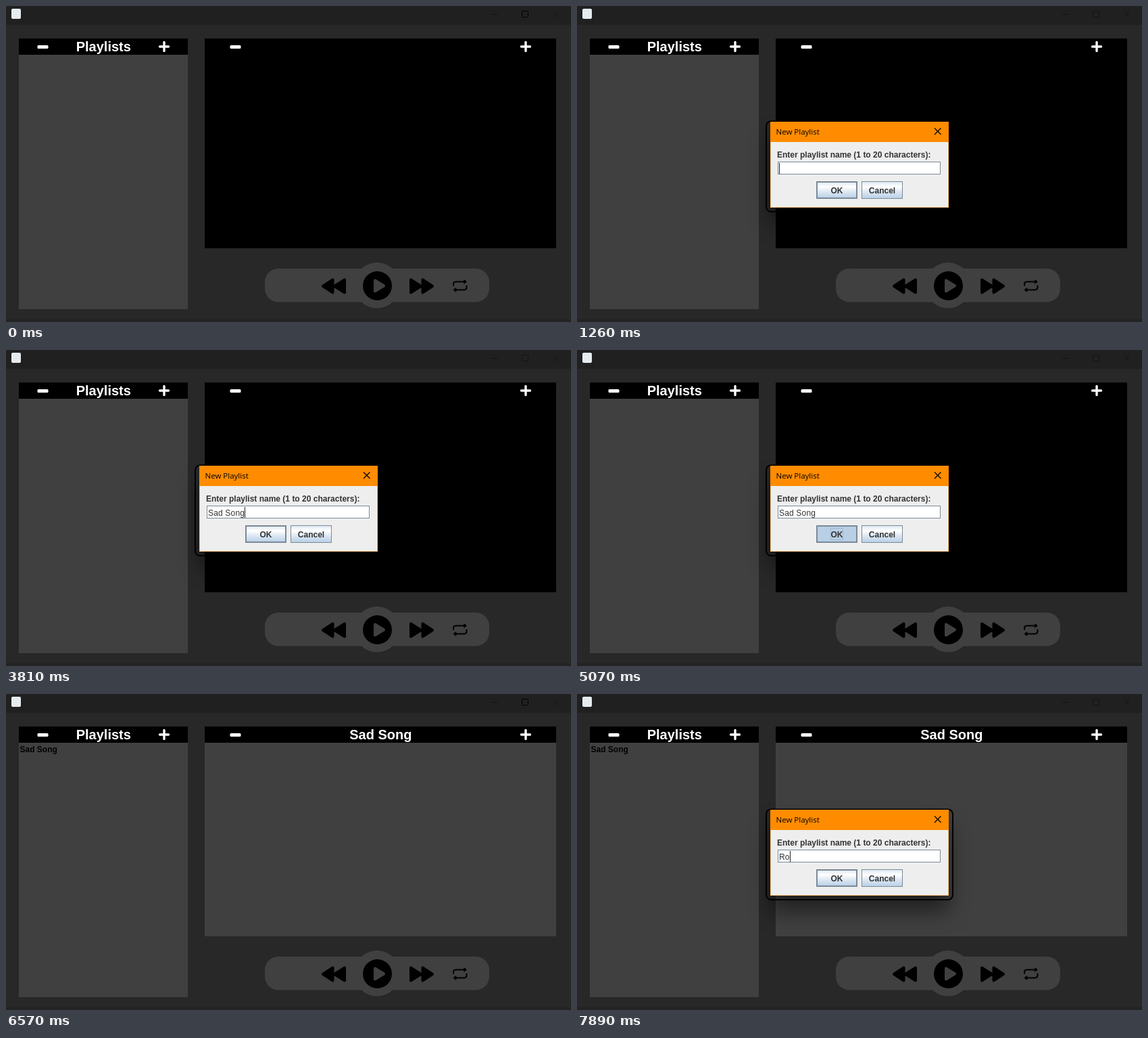
Animation of 836x467 px, one loop 8 s. Source, as an HTML page:

```html
<!DOCTYPE html>
<html lang="en">
<head>
<meta charset="utf-8">
<title>Playlists</title>
<style>
html, body { margin: 0; width: 100%; height: 100%; overflow: hidden; background: #282828; }
svg { display: block; width: 836px; height: 467px; }
text { font-family: "Liberation Sans", Arial, sans-serif; font-size: 12px; }
.head { font-size: 20px; font-weight: bold; fill: #fff; text-anchor: middle; }
.bold { font-weight: bold; fill: #333; }
.mid { text-anchor: middle; }
</style>
</head>
<body>
<svg viewBox="0 0 836 467">
  <defs>
    <linearGradient id="metal" x2="0" y2="1">
      <stop offset="0" stop-color="#dde8f3"/>
      <stop offset=".3" stop-color="#fff"/>
      <stop offset=".6" stop-color="#dde8f3"/>
      <stop offset="1" stop-color="#b8cfe5"/>
    </linearGradient>
    <filter id="blur" x="-40%" y="-70%" width="180%" height="240%"><feGaussianBlur stdDeviation="16"/></filter>
    <path id="plus" d="M-6.5 0H6.5M0-6.5V6.5" stroke="#fff" stroke-width="3.4" stroke-linecap="round"/>
    <rect id="minus" x="-8" y="-2.5" width="16" height="5" rx="1.5" fill="#fff"/>
    <path id="skip" d="M-16-9.5L-1 0L-16 9.5ZM1.5-9.5L16 0L1.5 9.5Z" stroke="#000" stroke-width="4" stroke-linejoin="round"/>
  </defs>

  <rect width="836" height="467" fill="#282828"/>
  <rect width="836" height="28" fill="#202020"/>
  <rect y="463" width="836" height="4" fill="#232323"/>
  <rect x="8" y="4" width="14" height="15" rx="2" fill="#e6ebf0"/>
  <g fill="none" stroke="#131313">
    <path d="M718 12.5H728M809.5 7.5L818.5 16.5M818.5 7.5L809.5 16.5"/>
    <rect id="maxi" x="763.5" y="7.5" width="9" height="9" rx="1"/>
  </g>

  <rect x="19" y="48" width="250" height="400" fill="#404040"/>
  <rect x="19" y="48" width="250" height="24"/>
  <use href="#minus" x="54.5" y="60.5"/>
  <text class="head" x="144.3" y="67">Playlists</text>
  <g id="add"><use href="#plus"/></g>

  <rect x="294" y="48" width="520" height="310"/>
  <g id="made">
    <rect x="294" y="72" width="520" height="286" fill="#404040"/>
    <text class="head" x="554.3" y="67">Sad Song</text>
    <text x="20.5" y="86" font-weight="bold">Sad Song</text>
  </g>
  <use href="#minus" x="339.5" y="60.5"/>
  <use href="#plus" x="769" y="60"/>

  <g fill="#404040">
    <rect x="383" y="388" width="332" height="49.5" rx="20"/>
    <circle cx="549" cy="412.8" r="33.7"/>
  </g>
  <use href="#skip" transform="translate(485 414) scale(-1 1)"/>
  <use href="#skip" transform="translate(615 414)"/>
  <circle cx="549.5" cy="413.5" r="21.5"/>
  <path d="M546 405.5L559 413.5L546 421.5Z" fill="#404040" stroke="#404040" stroke-width="4" stroke-linejoin="round"/>
  <g fill="none" stroke="#000" stroke-width="2" stroke-linecap="round" stroke-linejoin="round">
    <path d="M662 413V411.5Q662 407.5 666 407.5H680M681.5 413.5V415.5Q681.5 419.5 677.5 419.5H663.5"/>
    <path d="M678 405.5L680.5 407.5L678 409.5ZM665.5 417.5L663 419.5L665.5 421.5Z"/>
  </g>

  <g id="dialog">
    <rect x="286" y="194" width="264" height="127" opacity=".5" filter="url(#blur)"/>
    <rect x="280" y="170.5" width="276" height="133.5" rx="7" fill="none" stroke="#000" stroke-width="2"/>
    <rect x="286" y="171" width="264" height="127" fill="#eee"/>
    <rect x="286.5" y="171.5" width="263" height="126" fill="none" stroke="#ff8c00" opacity=".5"/>
    <rect x="286" y="171" width="264" height="30" fill="#ff8c00"/>
    <text x="294.5" y="190" style="font: 11.5px 'Open Sans', sans-serif">New Playlist</text>
    <path d="M529 180.5L538.5 190M538.5 180.5L529 190" stroke="#000" stroke-width="1.2"/>
    <text class="bold" x="296" y="224">Enter playlist name (1 to 20 characters):</text>
    <rect x="297.5" y="230.5" width="240" height="18" fill="#fff" stroke="#7a8a99"/>
    <text id="name" x="299" y="245" fill="#333" letter-spacing=".17"></text>
    <rect id="caret" y="232" width="1" height="16" fill="#222"/>
    <rect id="ok" x="355" y="260" width="59" height="24" stroke="#7a8a99" stroke-width="2"/>
    <rect id="focus" x="375.5" y="263.5" width="18" height="17" fill="none" stroke="#a3b8cc"/>
    <text class="bold mid" x="384.5" y="277">OK</text>
    <rect x="421.5" y="259.5" width="60" height="25" fill="url(#metal)" stroke="#7a8a99"/>
    <text class="bold mid" x="451.5" y="277">Cancel</text>
  </g>
</svg>
<script>
const LOOP = 8000;
const $ = id => document.getElementById(id);
const set = (id, key, val) => $(id).setAttribute(key, val);
const show = (id, on) => set(id, "visibility", on ? "visible" : "hidden");
const within = (t, spans) => spans.some(([a, b]) => t >= a && t < b);

const sessions = [
  { start: 1080, end: 5280, text: "Sad Song", keys: [2130, 2280, 2460, 2640, 3300, 3450, 3630, 3810] },
  { start: 6570, end: LOOP, text: "Ro", keys: [7710, 7890] }
];
const caretOff = [[1560, 1980], [3030, 3300], [4260, 4680], [5070, 5280], [6990, 7440]];
const advance = { S: 8, R: 9, " ": 3 };

function drawDialog(t) {
  const s = sessions.find(s => t >= s.start && t < s.end);
  const age = s ? Math.floor((t - s.start) / 30) * 30 : 0;
  const alpha = Math.min(1, age / 72);
  set("dialog", "display", alpha ? "inline" : "none");
  if (!alpha) return;

  const p = Math.min(1, age / 180);
  const k = 1 - 0.16 * (1 - p) ** 3;
  set("dialog", "opacity", alpha);
  set("dialog", "transform", `translate(354 208) scale(${k}) translate(-354 -208)`);

  const typed = s.text.slice(0, s.keys.filter(key => t >= key).length);
  $("name").textContent = typed;
  set("caret", "x", [...typed].reduce((x, c) => x + (advance[c] || 7), 299));
  show("caret", !within(t, caretOff));

  const pressed = within(t, [[5070, 5280]]);
  set("ok", "fill", pressed ? "#b8cfe5" : "url(#metal)");
  set("focus", "display", pressed ? "inline" : "none");
}

function draw(t) {
  const active = within(t, [[0, 930], [5280, 6600]]);
  const pressed = within(t, [[930, 1110], [6360, 6570]]);
  set("maxi", "stroke", active ? "#000" : "#131313");
  set("add", "transform", `translate(234 60) scale(${pressed ? 1.22 : 1})`);
  show("made", t >= 5280);
  drawDialog(t);
}

const begin = performance.now();
function tick() {
  draw((performance.now() - begin) % LOOP);
  requestAnimationFrame(tick);
}
tick();
</script>
</body>
</html>
```
